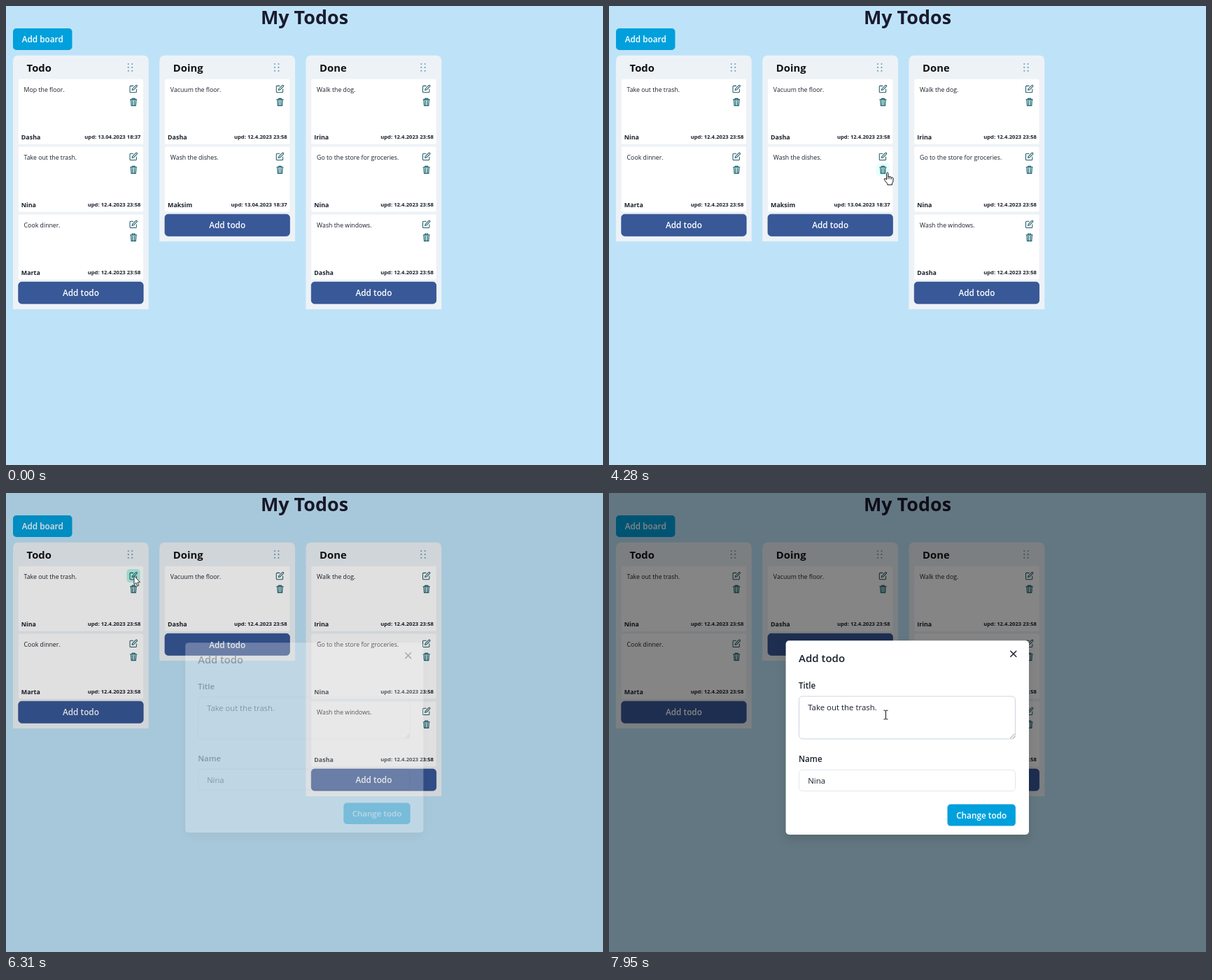
An HTML page that plays this animation: 853x657 px, repeating every 8000 ms.

```html
<!DOCTYPE html>
<html lang="en">
<head>
<meta charset="utf-8">
<title>My Todos</title>
<style>
  html, body { margin: 0; width: 100%; height: 100%; overflow: hidden; background: #bee3f8; }
  svg { display: block; font-family: "Open Sans", "Noto Sans", sans-serif; fill: #1a202c; }
  .h1 { font-size: 26.9px; font-weight: 700; fill: #1a1a2e; }
  .h2 { font-size: 14.8px; font-weight: 700; fill: #111; }
  .note { font-size: 8.75px; }
  .name { font-size: 8.9px; font-weight: 700; }
  .date { font-size: 7.7px; font-weight: 700; }
  .button { font-size: 11.8px; font-weight: 600; fill: #fff; }
  .header { font-size: 15px; font-weight: 600; }
  .label { font-size: 11.6px; font-weight: 600; }
  .input { font-size: 11.45px; }
  .line { fill: none; stroke-linecap: round; stroke-linejoin: round; }
  .dialog { filter: drop-shadow(0 6px 7px rgba(0, 0, 0, .12)); }
</style>
</head>
<body>
<svg id="stage" width="853" height="657" viewBox="0 0 853 657"></svg>
<script>
const LOOP = 8000;
const DELETE_MOP = 2310, DELETE_DISHES = 4550, OPEN_DIALOG = 6310;
const COLUMN_PITCH = 209.25, CARD_TOP = 104.7, CARD_PITCH = 96.9;
const HOVER = '#e6fffa', ACTIVE = '#b2f5ea';
const OLD = '12.4.2023 23:58', NEW = '13.04.2023 18:37';

const todo = (text, name, date = OLD, until = Infinity) => ({ text, name, date, until });
const columns = [
  { title: 'Todo', todos: [
    todo('Mop the floor.', 'Dasha', NEW, DELETE_MOP),
    todo('Take out the trash.', 'Nina'),
    todo('Cook dinner.', 'Marta')] },
  { title: 'Doing', todos: [
    todo('Vacuum the floor.', 'Dasha'),
    todo('Wash the dishes.', 'Maksim', NEW, DELETE_DISHES)] },
  { title: 'Done', todos: [
    todo('Walk the dog.', 'Irina'),
    todo('Go to the store for groceries.', 'Nina'),
    todo('Wash the windows.', 'Dasha')] }
];

// Icon button highlights: fade in over [a, b], fade out over [c, d].
const EDIT = 13.8, TRASH = 32.9;
const glows = [
  { col: 0, row: 0, icon: TRASH, color: HOVER, span: [1200, 1310, DELETE_MOP, DELETE_MOP] },
  { col: 0, row: 0, icon: TRASH, color: ACTIVE, span: [2110, 2240, DELETE_MOP, DELETE_MOP] },
  { col: 0, row: 0, icon: TRASH, color: HOVER, span: [DELETE_MOP, 2520, 3110, 3260] },
  { col: 1, row: 1, icon: TRASH, color: HOVER, span: [4010, 4210, 4700, 4700] },
  { col: 1, row: 1, icon: TRASH, color: ACTIVE, span: [4350, 4480, 4700, 4700] },
  { col: 0, row: 0, icon: EDIT, color: ACTIVE, span: [6120, 6240, 6330, 6450] }
];

// Pointer waypoints: time, x, y.
const path = [
  [390, 723, 627], [530, 596, 573], [680, 395, 436], [810, 301, 339], [1000, 208, 185],
  [1170, 182, 132], [2730, 182, 132], [2850, 176, 143.5], [3050, 176, 143.5],
  [3480, 290, 196], [3870, 383, 244], [3940, 386, 242], [4210, 398, 237.5], [4820, 397, 237],
  [5240, 280, 165], [5480, 184, 114], [5630, 180, 121], [5830, 182.5, 118],
  [6730, 182.5, 118], [7020, 310, 240], [7280, 385.5, 340.5], [7620, 385.5, 340.5], [7950, 395.5, 317.5]
];
const shapes = [
  [0, 'arrow'], [1150, 'hand'], [3110, 'arrow'], [4010, 'hand'], [DELETE_DISHES, 'arrow'],
  [5480, 'hand'], [OPEN_DIALOG, 'arrow'], [7150, 'beam']
];

const ramp = (t, a, b) => t < a ? 0 : t >= b ? 1 : (t - a) / (b - a);
const mix = (a, b, k) => a + (b - a) * k;

const text = (cls, x, y, str, anchor = 'start') =>
  `<text class="${cls}" x="${x}" y="${y}" text-anchor="${anchor}">${str}</text>`;
const rect = (x, y, w, h, fill, r = 0, extra = '') =>
  `<rect x="${x}" y="${y}" width="${w}" height="${h}" rx="${r}" fill="${fill}" ${extra}/>`;
const line = (d, color, width) =>
  `<path class="line" d="${d}" stroke="${color}" stroke-width="${width}"/>`;
const at = (x, y, body) => `<g transform="translate(${x} ${y})">${body}</g>`;
const button = (x, y, w, label, fill, extra) =>
  rect(x, y, w, 31, fill, 4.7, extra) + text('button', x + w / 2, y + 20.2, label, 'middle');

const editIcon = `<g transform="scale(.517) translate(-12 -12)">${line(
  'M11 4H4a2 2 0 0 0-2 2v14a2 2 0 0 0 2 2h14a2 2 0 0 0 2-2v-7' +
  'M18.5 2.5a2.1 2.1 0 0 1 3 3L12 15l-4 1 1-4z', '#1d5a66', 2)}</g>`;
const trashIcon =
  line('M-4.5-3.6H4.5M-2-4V-5.2H2V-4', '#1f6873', 1.3) +
  line('M-3.6-2.6L-3.1 5.1H3.1L3.6-2.6M-1.3-2V4.4M1.3-2V4.4', '#1f6873', 1.25);

function glow(t, col, row) {
  return glows.filter(g => g.col === col && g.row === row).map(g => {
    const [a, b, c, d] = g.span;
    const alpha = ramp(t, a, b) * (1 - ramp(t, c, d));
    return alpha ? rect(154.6, g.icon - 9.6, 19.2, 19.2, g.color, 4.6, `opacity="${alpha}"`) : '';
  }).join('');
}

function card(t, item, col, row) {
  return at(7.8, CARD_TOP + row * CARD_PITCH,
    rect(0, 0, 178.3, 93, '#fff', 2) +
    text('note', 7.8, 18.2, item.text) +
    text('name', 4, 86, item.name) +
    text('date', 174.7, 85.3, 'upd: ' + item.date, 'end') +
    glow(t, col, row) +
    at(164.4, EDIT, editIcon) + at(164.4, TRASH, trashIcon));
}

function column(t, { title, todos }, col) {
  const open = todos.filter(item => t < item.until);
  const buttonTop = CARD_TOP + open.length * CARD_PITCH;
  const bottom = buttonTop + 38.5;
  let grip = '';
  for (let i = 0; i < 6; i++)
    grip += `<circle cx="${164.8 + i % 2 * 5.4}" cy="${83 + (i >> 1) * 4.9}" r="1.1" fill="#74a3b3"/>`;
  return at(10 + col * COLUMN_PITCH, 0,
    `<path d="M0 ${bottom}V79q0-8.3 8-8.3H185.8q8 0 8 8.3V${bottom}z" fill="#edf2f7"/>` +
    text('h2', 19.6, 93.6, title) + grip +
    open.map((item, row) => card(t, item, col, row)).join('') +
    button(7.8, buttonTop - .3, 178.3, 'Add todo', '#385898', 'stroke="#2b4b87" stroke-width=".8"'));
}

function dialog(t) {
  const alpha = t < 6380 ? mix(.27, .7, ramp(t, OPEN_DIALOG, 6380)) : mix(.7, 1, ramp(t, 6380, 6480));
  const scale = mix(.979, 1, ramp(t, OPEN_DIALOG, 6430));
  const field = (y, h, border) =>
    rect(271.5, y, 309, h, '#fff', 4.7, `stroke="${border}" stroke-width="1"`);
  return `<g class="dialog" opacity="${alpha}" transform="translate(426.3 350) scale(${scale}) translate(-426.3 -350)">` +
    rect(252.6, 211.3, 347.4, 277.6, '#fff', 4.7) +
    text('header', 271, 241.8, 'Add todo') +
    line('M573.8 226.2l8 8M581.8 226.2l-8 8', '#1a202c', 1.5) +
    text('label', 271, 279.6, 'Title') +
    field(291, 61, t < 7150 ? '#e2e8f0' : '#cbd5e0') +
    text('input', 284.2, 310.8, 'Take out the trash.') +
    line('M573.5 351l6-6M577.3 351l2.5-2.5', '#777', .8) +
    text('label', 271, 385, 'Name') +
    field(396.4, 30.2, '#e2e8f0') +
    text('input', 284.2, 416.2, 'Nina') +
    button(483.5, 445.6, 97.4, 'Change todo', '#00a0dc') + '</g>';
}

const outline = (d, color = '#111') =>
  `<path d="${d}" fill="#fff" stroke="${color}" stroke-width="1" stroke-linejoin="round"/>`;
const cursors = {
  arrow: outline('M.5.5V13.2L3.4 10.5 5.3 15.2 7.2 14.4 5.3 9.9H9.2Z', '#333'),
  hand: at(-5.2, 0, outline('M3.9 11V1.8Q5-.4 6.2 1.8V7Q7.4 5.4 8.5 7.3 9.8 6 10.8 8 12.2 7 13.3 9V13' +
    'Q13 15.3 11.8 16.5V18.5H5.2V17Q3 14.5.7 11.2.2 8.8 2.2 9.6Z') +
    line('M6.2 7V10M8.5 7.5V10M10.8 8.2V10.4', '#111', .8)),
  beam: line('M-2.6-6.3H-1Q0-6.3 0-5.3V5.3Q0 6.3-1 6.3H-2.6M2.6-6.3H1Q0-6.3 0-5.3M0 5.3Q0 6.3 1 6.3H2.6', '#111', 1)
};

function pointer(t) {
  if (t < path[0][0]) return '';
  const next = path.findIndex(p => p[0] > t);
  const b = next < 0 ? path[path.length - 1] : path[next];
  const a = next < 0 ? b : path[next - 1];
  const k = ramp(t, a[0], b[0]);
  const shape = shapes.filter(s => s[0] <= t).pop()[1];
  return at(mix(a[1], b[1], k), mix(a[2], b[2], k), cursors[shape]);
}

function scene(t) {
  let out = rect(0, 0, 853, 657, '#bee3f8') +
    text('h1', 426.5, 26.4, 'My Todos', 'middle') +
    button(10, 32, 84.5, 'Add board', '#00a0dc') +
    columns.map((c, i) => column(t, c, i)).join('');
  if (t >= OPEN_DIALOG) {
    const shade = .48 * mix(.25, 1, ramp(t, OPEN_DIALOG, 6450));
    out += rect(0, 0, 853, 657, '#000', 0, `opacity="${shade}"`) + dialog(t);
  }
  return out + pointer(t);
}

const stage = document.getElementById('stage');
const start = performance.now();
function frame() {
  stage.innerHTML = scene((performance.now() - start) % LOOP);
  requestAnimationFrame(frame);
}
frame();
</script>
</body>
</html>
```
